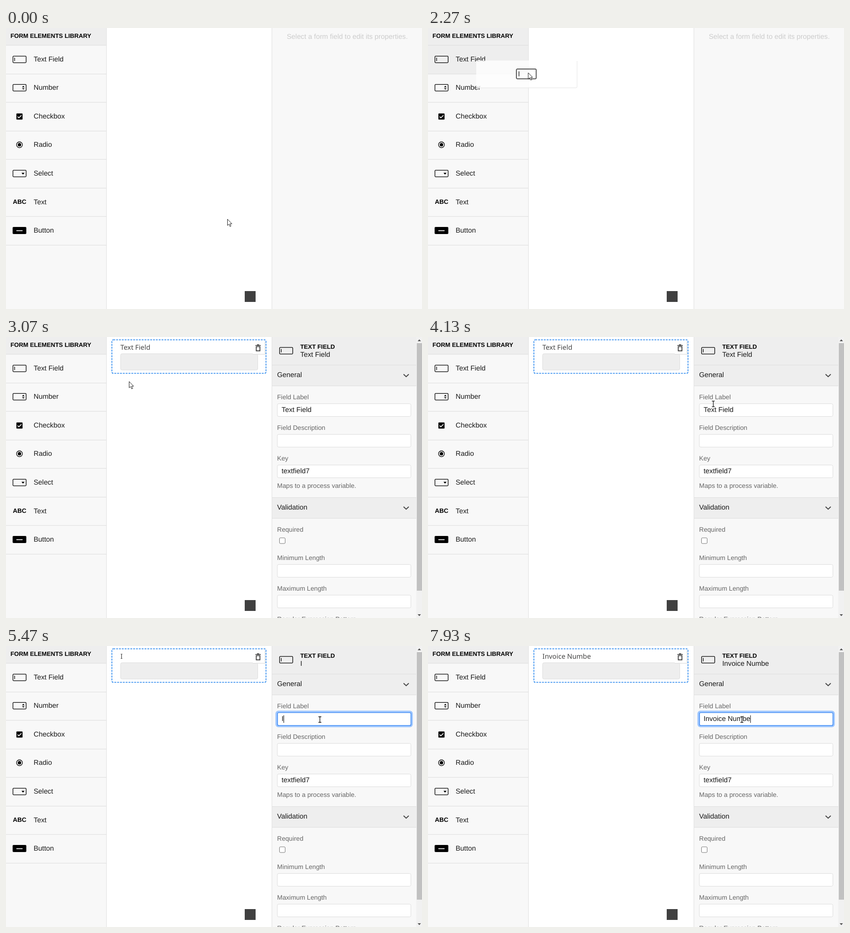
An HTML page for the animation above (8 s loop, 880 by 596 pixels).

```html
<!DOCTYPE html>
<html lang="en">
<head>
<meta charset="utf-8">
<title>Form editor</title>
<style>
  html, body { margin: 0; width: 100%; height: 100%; overflow: hidden; background: #fff; }
  svg { display: block; width: 100%; height: 100%; }
  text { font: 14.8px "Liberation Sans", Arial, sans-serif; fill: #181818; white-space: pre; text-rendering: geometricPrecision; }
  .bold { font-size: 12.8px; font-weight: bold; fill: #000; }
  .label { font-size: 13.7px; fill: #666; }
  .hint { fill: #ccc; }
  .canvas-label { font: 14.4px "Noto Sans", sans-serif; fill: #444; }
  .inverse { fill: #fff; }
  .line { fill: #e0e0e0; }
  .soft { fill: #eee; }
  .input { fill: #fff; stroke: #ddd; }
  .stroke { fill: none; stroke: #000; stroke-width: 1.3; }
  .pointer { fill: #fff; stroke: #222; stroke-width: 1; stroke-linejoin: round; }
</style>
</head>
<body>
<svg id="stage" viewBox="0 0 880 596">
  <defs>
    <g id="box"><rect class="stroke" x=".65" y=".65" width="27.9" height="13.9" rx="1.5"/></g>
    <g id="textfield"><use href="#box"/><path class="stroke" d="M4.3 4V11"/></g>
    <g id="number"><use href="#box"/><path d="M20 6.7L22.6 3.6L25.2 6.7ZM20 8.7L22.6 11.8L25.2 8.7Z"/></g>
    <g id="checkbox"><rect x="8" y="1.2" width="13" height="13" rx="1.2"/>
      <path d="M10.5 7.8L13.3 10.6L18.7 5" fill="none" stroke="#fff" stroke-width="1.7"/></g>
    <g id="radio"><circle class="stroke" cx="14.5" cy="7.7" r="6.2"/><circle cx="14.5" cy="7.7" r="3.6"/></g>
    <g id="select"><use href="#box"/><path d="M18.8 6L25.2 6L22 10Z"/></g>
    <g id="abc"><text class="bold" x=".5" y="12.3" style="font-size:13.2px">ABC</text></g>
    <g id="button"><rect width="29" height="15" rx="2"/>
      <path d="M8 8.3l1.6-.7 1.6.7 1.6-.7 1.7.7 1.6-.7 1.7.7 1.6-.7 1.6.7" fill="none" stroke="#fff" stroke-width="1.5"/></g>
    <g id="chevron"><path d="M0 0L5.5 5.3L11 0" fill="none" stroke="#444" stroke-width="1.9"/></g>
  </defs>

  <rect width="880" height="596" fill="#fff"/>
  <rect width="212" height="596" fill="#f8f8f8"/>
  <rect class="soft" width="212" height="37"/>
  <rect id="hover" class="soft" width="212" height="60"/>
  <text class="bold" x="9.5" y="21.3">FORM ELEMENTS LIBRARY</text>
  <g id="palette"></g>
  <rect class="line" x="212" width="1" height="596"/>
  <rect x="505" y="558" width="23" height="23" fill="#404040"/>
  <rect x="563" width="317" height="596" fill="#f8f8f8"/>
  <rect class="line" x="562" width="1" height="596"/>
  <text id="empty" class="hint" x="594" y="23">Select a form field to edit its properties.</text>

  <g id="editor">
    <rect x="242.5" y="35.5" width="290" height="34.5" rx="3" fill="#eee" stroke="#ddd"/>
    <text id="fieldLabel" class="canvas-label" x="242" y="26.5"></text>
    <path d="M522 36.5H547.5V10" fill="none" stroke="#ddd" stroke-width="1.5"/>
    <rect x="522" y="9" width="25" height="27" fill="#fff"/>
    <path d="M527.5 18H539M531 16.6H535.5M529.4 20.5V29.3H537.2V20.5Z" fill="none" stroke="#333" stroke-width="1.7"/>
    <rect x="224" y="6" width="326" height="71" rx="3" fill="none" stroke="#2384ee" stroke-width="1.6" stroke-dasharray="4 2"/>
    <rect class="soft" x="563" width="305" height="103"/>
    <rect class="soft" x="563" y="340" width="305" height="44"/>
    <use href="#textfield" x="578" y="21.5"/>
    <text class="bold" x="622.5" y="25.3">TEXT FIELD</text>
    <text id="title" x="622.5" y="42"></text>
    <text x="573.5" y="85">General</text>
    <text x="573.5" y="366">Validation</text>
    <use href="#chevron" x="841" y="79"/>
    <use href="#chevron" x="841" y="360"/>
    <rect x="578.5" y="426" width="12" height="12" rx="2" fill="#fff" stroke="#767676"/>
    <g id="panel"></g>
    <g id="focus" fill="none">
      <rect x="572.3" y="139.5" width="286" height="30.5" rx="4" stroke="#9cc5fe" stroke-width="4.5"/>
      <rect x="574.5" y="141.5" width="282" height="27" rx="2" stroke="#2b7df0" stroke-width="1.2"/>
    </g>
    <rect id="selection" x="583" y="146" width="64" height="17" fill="#3390ff"/>
    <text id="value" x="583" y="159"></text>
    <rect id="caret" y="147" width="1" height="16"/>
    <text x="583" y="289">textfield7</text>
    <rect x="868" width="12" height="596" fill="#f1f1f1"/>
    <rect x="869" y="13" width="11" height="525" fill="#c1c1c1"/>
    <path d="M870.8 9L874.3 5L877.8 9ZM870.8 588L874.3 592L877.8 588Z" fill="#555"/>
  </g>

  <rect id="dropLine" x="218" y="4" width="339" height="4" fill="#2384ee"/>
  <g id="preview">
    <rect width="213" height="57.5" rx="3" fill="#fff" opacity=".8"/>
    <path d="M1 57.8H210.5Q213.3 57.8 213.3 55V1" fill="none" stroke="#eaeaea" stroke-width="1.2"/>
    <use href="#textfield" transform="translate(84 17) scale(1.5)" opacity=".65"/>
  </g>

  <g id="arrow"><path class="pointer" d="M0 0V13.3L3.1 10.5L5.3 15.5L7.5 14.6L5.3 9.8H9.4Z"/></g>
  <g id="hand"><path class="pointer" d="M-4 8.5L-6.3 3.5Q-7 .5-4.5 1V-5.5Q-3.2-8-2-5.5V-6.5Q-.5-9 1-6.5V-5.5Q2.3-8 3.7-5.5V-3.5Q5.3-5.5 6.5-3.2V3L4.5 8.5ZM-2-5V-1M1-5.5V-1M3.7-4.5V-1"/></g>
  <g id="beam" fill="none">
    <path d="M-3-6H3M0-6V6M-3 6H3" stroke="#fff" stroke-width="3"/>
    <path d="M-3-6H-.8L0-5.3L.8-6H3M0-5.5V5.5M-3 6H-.8L0 5.3L.8 6H3" stroke="#111" stroke-width="1.3"/>
  </g>
</svg>
<script>
const LOOP = 8000, FPS = 15, ROW = 60.55, TOP = 36.5;
const el = {};
document.querySelectorAll("#stage [id]").forEach(node => el[node.id] = node);

// Static lists
const items = [["textfield", "Text Field"], ["number", "Number"], ["checkbox", "Checkbox"],
  ["radio", "Radio"], ["select", "Select"], ["abc", "Text"], ["button", "Button"]];
const rule = (x, y, w) => `<rect class="line" x="${x}" y="${y}" width="${w}" height="1.2"/>`;

el.palette.innerHTML = rule(0, 36, 212) + items.map(([icon, name], i) =>
  `<use href="#${icon}" x="14" y="${Math.round(58.7 + ROW * i)}"/>` +
  `<text x="58.5" y="${Math.round(70.8 + ROW * i)}">${name}</text>` +
  rule(0, Math.floor(TOP + ROW * (i + 1)), 212)).join("");

const labels = [["Field Label", 132], ["Field Description", 197], ["Key", 262],
  ["Maps to a process variable.", 320], ["Required", 413], ["Minimum Length", 473],
  ["Maximum Length", 538], ["Regular Expression Pattern", 603]];
el.panel.innerHTML =
  [59, 103, 340, 384].map(y => rule(563, y, 305)).join("") +
  [141, 206, 271, 482, 547].map(y =>
    `<rect class="input" x="574" y="${y + .5}" width="282.5" height="27" rx="3"/>`).join("") +
  labels.map(([s, y]) => `<text class="label" x="573.5" y="${y}">${s}</text>`).join("");

// Steps, counted in ticks of 1/15 s
const DRAG = 32, DROP = 46, FOCUS = 66, SELECT = 72;
const keys = [82, 86, 88, 90, 93, 95, 96, 98, 107, 110, 114, 117, 119];
const typed = "Invoice Numbe";
const dragPath = [[105, 78], [168, 93], [212, 95], [238, 100], [252, 103], [258, 101], [260, 97], [260.5, 94.5]];

const clamp = x => Math.max(0, Math.min(1, x));
const smooth = x => x * x * (3 - 2 * x);
const bezier = (a, b, c, d, t) => {
  const u = 1 - t;
  return u * u * u * a + 3 * u * u * t * b + 3 * u * t * t * c + t * t * t * d;
};

function pointer(n) {
  if (n < 11) return [468.5, 405.5];
  if (n < 27) {
    const p = smooth(clamp((n - 13) / 13) ** 1.65);
    return [467.9 - 401.9 * p, 404.5 - 342.5 * p];
  }
  if (n < DRAG) return [66, 60];
  if (n < 50) return dragPath[Math.min(n - DRAG, dragPath.length - 1)];
  const p = smooth(clamp((n - 50) / 16));
  return [bezier(260.5, 395, 537, 664, p), bezier(94.5, 50, 134, 156, p)];
}

const show = (node, on) => node.setAttribute("display", on ? "inline" : "none");
const move = (node, x, y) => node.setAttribute("transform", `translate(${x.toFixed(1)} ${y.toFixed(1)})`);

function draw(time) {
  const n = Math.floor((time % LOOP + 4) * FPS / 1000);
  const [x, y] = pointer(n);
  const dropped = n >= DROP, dragging = n >= DRAG && !dropped;

  const overRow = n < DRAG && x < 212;
  const row = dragging ? 0 : Math.floor((y - TOP) / ROW);
  show(el.hover, overRow || dragging);
  el.hover.setAttribute("y", Math.floor(TOP + ROW * row) + 1);

  show(el.preview, dragging);
  show(el.dropLine, dragging && n > 34);
  if (dragging) {
    // The preview trails the pointer by one tick
    const [px, py] = pointer(n - 1);
    move(el.preview, px - 66, py - 24);
  }

  show(el.empty, !dropped);
  show(el.editor, dropped);
  const count = keys.filter(k => n >= k).length;
  const text = count ? typed.slice(0, count) : "Text Field";
  for (const node of [el.fieldLabel, el.title, el.value]) node.textContent = text;

  const selected = n >= SELECT && !count;
  show(el.focus, n >= FOCUS);
  show(el.selection, selected);
  el.value.classList.toggle("inverse", selected);
  show(el.caret, n >= FOCUS && !selected);
  if (n >= FOCUS) el.caret.setAttribute("x", 583 + el.value.getComputedTextLength());

  const kind = overRow ? "hand" : x > 574 && y > 138 && dropped ? "beam" : "arrow";
  for (const name of ["arrow", "hand", "beam"]) show(el[name], name === kind);
  move(el[kind], x, y);
}

const start = performance.now();
function tick() {
  draw(performance.now() - start);
  requestAnimationFrame(tick);
}
tick();
</script>
</body>
</html>
```
